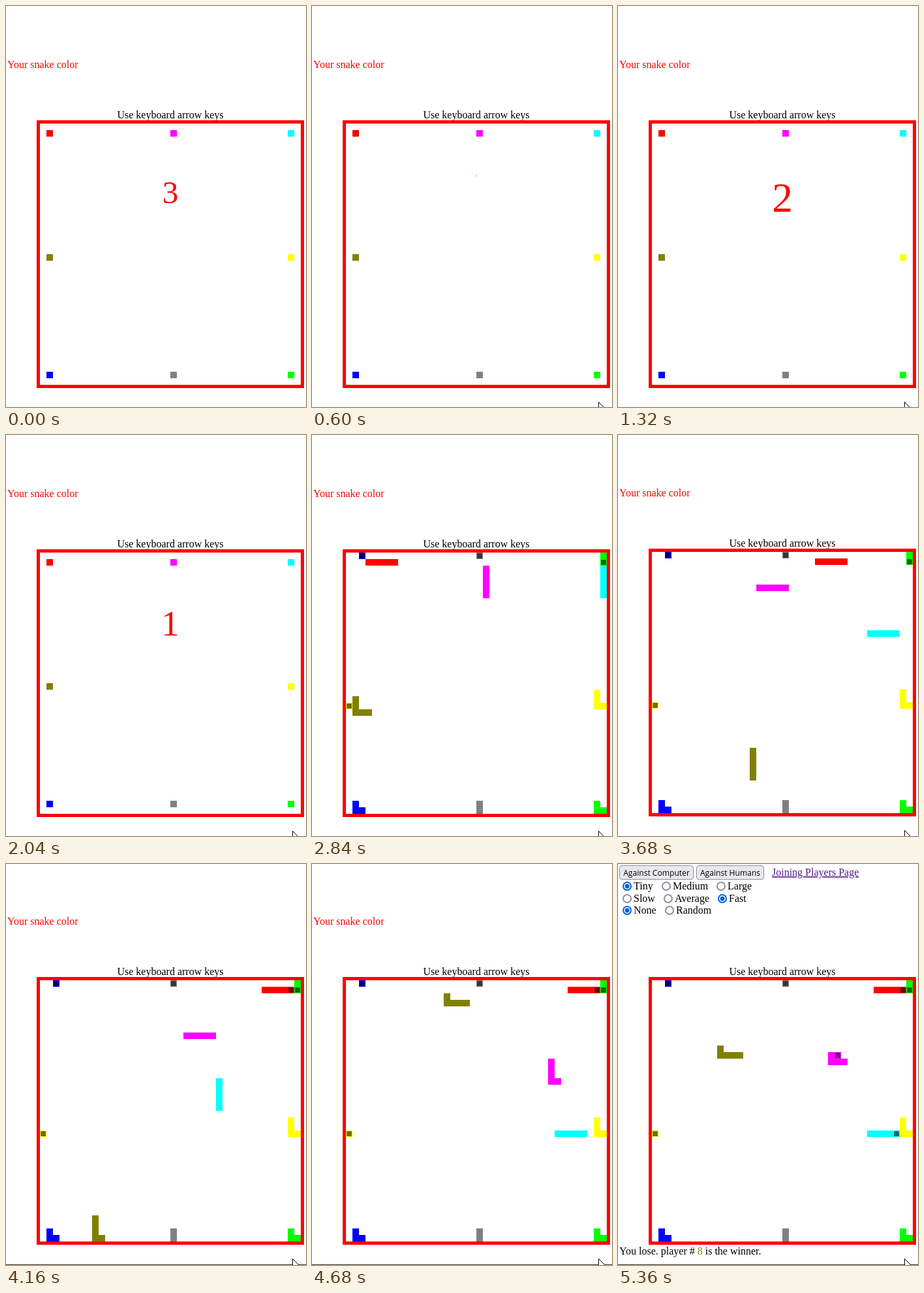
An HTML page that plays this animation: 460x614 px, repeating every 8 s.

```html
<!DOCTYPE html>
<html lang="en">
<head>
<meta charset="utf-8">
<title>Snakes</title>
<style>
  html, body { margin: 0; width: 100%; height: 100%; overflow: hidden; background: #fff; }
  svg { display: block; font: 16px "Liberation Serif", "Times New Roman", serif; }
  .button rect { fill: #e9e9ed; stroke: #8f8f9d; }
  .button text { font: 12.1px "Open Sans", "Noto Sans", sans-serif; }
  .link { fill: #551a8b; text-decoration: underline; }
  .radio { fill: #fff; stroke: #8f8f9d; stroke-width: 2; }
  .radio.on { stroke: #0060df; }
  .dot { fill: #0060df; }
</style>
</head>
<body>
<svg width="460" height="614" viewBox="0 0 460 614">
  <g id="page">
    <text id="label" x="2" y="95" fill="red">Your snake color</text>
    <text x="252" y="172" text-anchor="middle">Use keyboard arrow keys</text>
    <rect x="49.5" y="177.5" width="405" height="405" fill="none" stroke="red" stroke-width="5"/>
    <g id="board" transform="translate(52 180)" shape-rendering="crispEdges"></g>
    <text id="count" x="252" text-anchor="middle" fill="red"></text>
    <rect y="615" width="460" height="1" fill="#333"/>
    <path id="cursor" d="M439.5 606.5V624L450 617Z" fill="#fff" stroke="#000"/>
  </g>
  <g id="menu">
    <g class="button">
      <rect x="2.5" y="2.5" width="113" height="21" rx="3.5"/>
      <text x="59" y="17.5" text-anchor="middle">Against Computer</text>
      <rect x="120.5" y="2.5" width="103" height="21" rx="3.5"/>
      <text x="172" y="17.5" text-anchor="middle">Against Humans</text>
    </g>
    <text class="link" x="236" y="18">Joining Players Page</text>
    <g id="radios"></g>
    <text x="2" y="598">You lose. player # <tspan fill="olive">8</tspan> is the winner.</text>
  </g>
</svg>
<script>
const $ = id => document.getElementById(id);
const LOOP = 8000, BODY = 5, CELLS = 40;
const GAME_START = 2607, TICK = 37.7, LAST_TICK = 73;
const DIRS = { R: [1, 0], L: [-1, 0], D: [0, 1], U: [0, -1] };

// colour, start column, start row, moves
const snakes = [
  ['red', 1, 1, 'R37'],
  ['magenta', 20, 1, 'R1 D12 R1 U8 L6 D3 R15 D7 R5 U3 L9 U1 R1'],
  ['cyan', 38, 1, 'R1 D16 L1 U5 L11 D11 R10'],
  ['yellow', 38, 20, 'D3 R2'],
  ['lime', 38, 38, 'D1 R1 D2'],
  ['gray', 20, 38, 'D2'],
  ['blue', 1, 38, 'D1 R1 D1'],
  ['olive', 1, 20, 'D4 R14 D12 L7 D3 R7 D4 R3 D3 L8 D5 R3']
].map(([color, x, y, moves]) => {
  const cells = [[x, y]];
  for (const move of moves.split(' ')) {
    const [dx, dy] = DIRS[move[0]];
    for (let i = +move.slice(1); i--;) {
      x = (x + dx + CELLS) % CELLS;
      y = (y + dy + CELLS) % CELLS;
      cells.push([x, y]);
    }
  }
  const group = $('board').appendChild(document.createElementNS('http://www.w3.org/2000/svg', 'g'));
  group.innerHTML = `<path fill="${color}"/><g>
    <rect x="1" y="1" width="8" height="8" fill-opacity=".45"/>
    <path d="M2.5 2.5h5v5h-5z" fill="none" stroke="#000" stroke-opacity=".45"/>
    <rect x="4" y="4" width="2" height="2" fill-opacity=".5"/></g>`;
  return { cells, body: group.children[0], mark: group.children[1] };
});

const options = [
  [34, [14, 'Tiny', 1], [74, 'Medium'], [158, 'Large']],
  [53, [14, 'Slow'], [77, 'Average'], [160, 'Fast', 1]],
  [71, [14, 'None', 1], [79, 'Random']]
];
$('radios').innerHTML = options.map(([y, ...row]) => row.map(([x, name, on]) =>
  `<circle class="radio${on ? ' on' : ''}" cx="${x}" cy="${y}" r="6"/>` +
  (on ? `<circle class="dot" cx="${x}" cy="${y}" r="3.5"/>` : '') +
  `<text x="${x + 10}" y="${y + 5}">${name}</text>`).join('')).join('');

const bezier = (u, a, b) => 3 * a * u * (1 - u) ** 2 + 3 * b * u * u * (1 - u) + u ** 3;

// The standard "ease" curve
function ease(p) {
  if (p >= 1) return 1;
  let low = 0, high = 1;
  for (let i = 0; i < 24; i++) {
    const mid = (low + high) / 2;
    if (bezier(mid, .25, .25) < p) low = mid; else high = mid;
  }
  return bezier(low, .1, 1);
}

// The screen refreshes every 66 ms on a 40 ms grid
function refreshTime(t) {
  const k = Math.ceil((40 * (Math.floor(t / 40) + 1) - 22) / 66) - 1;
  return 40 * Math.floor((66 * k + 22) / 40);
}

const show = (el, on) => el.setAttribute('visibility', on ? 'visible' : 'hidden');

function drawCount(t) {
  const starts = [-420, 535, 1535, 2535];
  const i = starts.findLastIndex(s => t >= s);
  const size = 64 * ease((t - starts[i]) / 900);
  const count = $('count');
  count.textContent = 3 - i || '';
  count.style.fontSize = size + 'px';
  count.setAttribute('y', 257.7 + .9 * size);
}

function drawSnake({ cells, body, mark }, tick) {
  const head = Math.min(tick, cells.length - 1);
  const part = cells.slice(Math.max(0, head - BODY + 1), head + 1);
  body.setAttribute('d', part.map(([x, y]) => `M${x * 10} ${y * 10}h10v10h-10z`).join(''));
  mark.setAttribute('transform', `translate(${cells[head].map(v => v * 10)})`);
  show(mark, tick >= cells.length);
}

function draw(t) {
  const tick = Math.max(0, Math.min(LAST_TICK, Math.floor((t - GAME_START) / TICK)));
  const over = tick === LAST_TICK;
  drawCount(t);
  snakes.forEach(snake => drawSnake(snake, tick));
  $('page').setAttribute('transform', `translate(0 ${-(t >= 3080) - (t >= 3880)})`);
  show($('cursor'), t >= 320);
  show($('label'), !over);
  show($('menu'), over);
}

const start = performance.now();
function loop() {
  draw(refreshTime((performance.now() - start + 5) % LOOP));
  requestAnimationFrame(loop);
}
loop();
</script>
</body>
</html>
```
